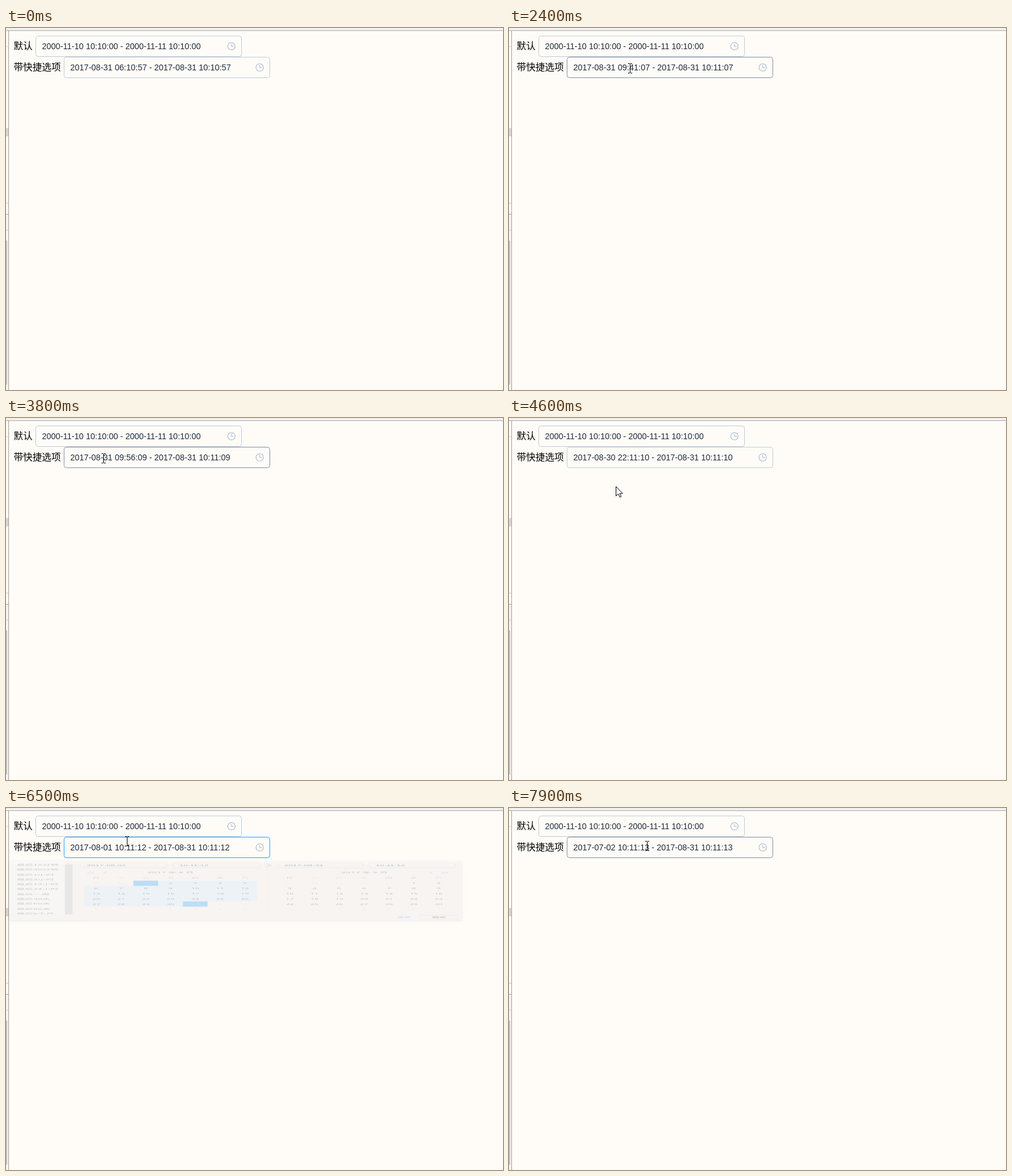
These frames come from a looping animation (843 px wide and 615 px high, 8 s). An HTML page with a canvas:

```html
<!DOCTYPE html>
<html lang="zh-CN">
<head>
<meta charset="utf-8">
<title>时间范围选择</title>
<style>
  html, body { margin: 0; width: 100%; height: 100%; overflow: hidden; background: #fffcf8; }
  canvas { display: block; }
</style>
</head>
<body>
<canvas id="stage" width="843" height="615"></canvas>
<script>
const ctx = document.getElementById('stage').getContext('2d');
const LOOP = 8000, STEP = 100, ANIM = 300;
const ARIAL = '"Liberation Sans", Arial, sans-serif';
const CJK = '"Noto Sans CJK SC", "Noto Sans CJK", sans-serif';
const NUM = '"Noto Sans", "Noto Sans CJK SC", "Noto Sans CJK", sans-serif';
const PAGE = '#fffcf8', BORDER = '#bfcbd9', BLUE = '#20a0ff', INK = '#48576a', ICON = '#97a8be';
const TOP = 91;

const SHORTCUTS = ['15分钟', '30分钟', '1小时', '4小时', '12小时', '24小时', '一周', '30天', '60天', '90天', '6个月'];

// Each session: popup opens, a shortcut is picked, the next session shows that value.
const SESSIONS = [
  { open: 975, pick: 1900, from: '2017-08-31 06:10:57', to: '2017-08-31 10:10:57' },
  { open: 2430, pick: 3100, from: '2017-08-31 09:41:07', to: '2017-08-31 10:11:07' },
  { open: 3830, pick: 4400, from: '2017-08-31 09:56:09', to: '2017-08-31 10:11:09' },
  { open: 5164, pick: 5900, from: '2017-08-30 22:11:10', to: '2017-08-31 10:11:10' },
  { open: 6480, pick: 7300, from: '2017-08-01 10:11:12', to: '2017-08-31 10:11:12' },
  { open: 1e9, pick: 1e9, from: '2017-07-02 10:11:13', to: '2017-08-31 10:11:13' }
];

// Pointer path: time, x, y
const PATH = [
  [300, 404, 131], [600, 330, 108], [900, 300, 68], [1100, 290, 68], [1200, 250, 80],
  [1400, 110, 150], [1500, 86, 157], [1700, 82, 138], [1900, 82, 138], [2200, 150, 95],
  [2400, 205, 68], [2700, 209, 68], [2800, 130, 95], [2900, 77, 107], [3100, 77, 107],
  [3500, 165, 68], [3900, 165, 68], [4000, 150, 110], [4100, 120, 183], [4200, 70, 228],
  [4400, 70, 228], [4600, 181, 116], [4800, 215, 68], [5200, 215, 68], [5300, 190, 100],
  [5500, 90, 250], [5700, 44, 320], [5900, 44, 320], [6100, 130, 180], [6300, 205, 56],
  [6500, 205, 56], [6700, 140, 190], [7000, 62, 366], [7300, 62, 366], [7500, 140, 200],
  [7700, 236, 53], [7800, 236, 53], [7900, 234, 64]
];

// cubic-bezier(.23, 1, .32, 1)
function ease(x) {
  if (x <= 0) return 0;
  if (x >= 1) return 1;
  let lo = 0, hi = 1;
  for (let i = 0; i < 24; i++) {
    const s = (lo + hi) / 2, r = 1 - s;
    if (3 * r * r * s * .23 + 3 * r * s * s * .32 + s * s * s < x) lo = s; else hi = s;
  }
  return 1 - (1 - lo) ** 3;
}

function pointerAt(t) {
  if (t < PATH[0][0]) return null;
  const i = PATH.findIndex(p => p[0] > t);
  if (i < 0) return { x: PATH.at(-1)[1], y: PATH.at(-1)[2] };
  const [t0, x0, y0] = PATH[i - 1], [t1, x1, y1] = PATH[i];
  const k = (t - t0) / (t1 - t0);
  return { x: Math.round(x0 + (x1 - x0) * k), y: Math.round(y0 + (y1 - y0) * k) };
}

function rect(x, y, w, h, color) {
  ctx.fillStyle = color;
  ctx.fillRect(x, y, w, h);
}

function text(str, x, cy, size, color, family = CJK, align = 'left') {
  ctx.font = size + 'px ' + family;
  ctx.fillStyle = color;
  ctx.textAlign = align;
  ctx.fillText(str, x, Math.round(cy + size * .36));
}

function box(x, y, w, h, border, radius = 4, fill) {
  ctx.beginPath();
  ctx.roundRect(x + .5, y + .5, w - 1, h - 1, radius);
  if (fill) { ctx.fillStyle = fill; ctx.fill(); }
  ctx.strokeStyle = border;
  ctx.lineWidth = 1;
  ctx.stroke();
}

function line(points, color, width) {
  ctx.beginPath();
  points.forEach(([x, y]) => ctx.lineTo(x, y));
  ctx.strokeStyle = color;
  ctx.lineWidth = width;
  ctx.stroke();
}

// dir: 1 points right, -1 points left
function chevron(x, y, w, h, dir, width) {
  const a = dir * w / 2;
  line([[x - a, y - h / 2], [x + a, y], [x - a, y + h / 2]], ICON, width);
}

function clock(x, y) {
  ctx.beginPath();
  ctx.arc(x, y, 6.3, 0, Math.PI * 2);
  ctx.strokeStyle = BORDER;
  ctx.lineWidth = 1.6;
  ctx.stroke();
  line([[x, y - 4], [x, y + .3], [x + 4, y + .3]], BORDER, 1.4);
}

function field(label, x, y, value, border) {
  text(label, 13, y + 17.5, 16, '#000');
  box(x, y, 350, 36, border);
  text(value, x + 11, y + 18, 14, '#1f2d3d', ARIAL);
  clock(x + 332.4, y + 18);
}

function page() {
  rect(0, 0, 843, 615, PAGE);
  rect(0, 0, 843, 4, '#f0f0f0');
  rect(0, 170, 4, 14, '#d6d6d6');
  rect(0, 317, 4, 27, '#f2f2f2');
  rect(0, 344, 4, 271, '#f4f4f4');
  rect(0, 361, 2, 245, '#c4c4c4');
  rect(0, 31, 4, 1, '#d8d8d8');
  rect(0, 297, 4, 1, '#c8c8c8');
  rect(0, 316, 4, 1, '#a0a0a0');
  rect(0, 343, 4, 1, '#cfcfcf');
  rect(0, 4, 843, 1, '#ababab');
  rect(4, 4, 1, 611, '#a0a0a0');
}

// first: weekday of day 1; start/end: picked days
function month(left, step, title, titleX, first, days, start, end) {
  text(title, titleX, 160, 14, INK, NUM, 'center');
  [...'日一二三四五六'].forEach((d, i) => text(d, left + 21 + i * step, 194, 12, '#8391a5', CJK, 'center'));
  for (let i = 0; i < 42; i++) {
    const day = i - first + 1, inside = day > 0 && day <= days;
    const x = left + (i % 7) * step, y = 209 + Math.floor(i / 7) * 32;
    const shown = day < 1 ? day + 31 : inside ? day : day - days;
    let color = inside ? INK : '#dddddd', label = shown;
    if (inside && day >= start && day <= end) {
      const edge = day === start || day === end;
      rect(x, y, 42, 32, edge ? BLUE : '#d2ecff');
      if (edge) color = '#fff';
      if (day === 31) label = '今天';
    }
    text(label, x + 21, y + 16.5, 12, color, NUM, 'center');
  }
}

function sidebar(mouse) {
  rect(6, 92, 109, 325, '#f9f9fa');
  ctx.save();
  ctx.beginPath();
  ctx.rect(6, 92, 93, 325);
  ctx.clip();
  SHORTCUTS.forEach((s, i) => {
    const y = 97 + i * 30;
    if (mouse && mouse.x < 98 && mouse.y >= y && mouse.y < y + 30) rect(6, y, 92, 30, '#e4e8f1');
    text('最后' + s, 18, y + 15, 14, INK);
  });
  ctx.restore();
  rect(98, 92, 17, 325, '#f1f1f1');
  rect(100, 108, 13, 309, '#c1c1c1');
  ctx.fillStyle = '#a3a3a3';
  ctx.beginPath();
  ctx.moveTo(103, 103);
  ctx.lineTo(106.5, 99);
  ctx.lineTo(110, 103);
  ctx.fill();
  rect(115, 92, 1, 325, '#e4e4e4');
}

function popup(s, p, mouse) {
  ctx.save();
  ctx.globalAlpha = p;
  ctx.translate(0, TOP);
  ctx.scale(1, p);
  ctx.translate(0, -TOP);

  ctx.save();
  ctx.shadowColor = 'rgba(80,100,130,.35)';
  ctx.shadowBlur = 5;
  ctx.shadowOffsetY = 1;
  rect(5, 91, 768, 362, PAGE);
  ctx.restore();
  box(5, 90, 768, 363, '#d1dbe5', 2, PAGE);

  sidebar(mouse);

  const [d0, t0] = s.from.split(' '), [d1, t1] = s.to.split(' ');
  [[126, 147, d0], [283, 148, t0], [461, 145, d1], [616, 146, t1]].forEach(([x, w, v]) => {
    box(x, 99, w, 30, BORDER);
    text(v, x + 11, 114, 13, '#1f2d3d', ARIAL);
  });
  chevron(446, 114, 8, 19, 1, 2.2);

  rect(116, 134, 656, 1, '#e4e4e4');
  rect(443, 135, 1, 282, '#e4e4e4');
  [[141, -1], [147, -1], [168, -1], [720, 1], [741, 1], [747, 1]].forEach(([x, dir]) => chevron(x, 160, 5.5, 12, dir, 1.4));

  month(132, 42, '2017 年 8 月', 279, 2, 31, +d0.slice(8), +d1.slice(8));
  month(460, 42.15, '2017 年 9 月', 608, 5, 30, 0, 0);

  rect(6, 417, 766, 1, '#dfe2e6');
  text('清空', 675, 435, 12, BLUE, CJK, 'center');
  box(702, 422, 66, 26, '#d0d0d0', 2);
  text('确定', 735, 435, 12, '#1f2d3d', CJK, 'center');
  ctx.restore();
}

const SHAPES = {
  arrow: new Path2D('M.5 .5V16.5L4.3 13 7 18.6 9.3 17.5 6.8 12.2H11.8Z'),
  hand: new Path2D('M-1.7 1.5Q0-1 1.7 1.5V7.5Q3.5 6 4.7 8 6.5 7 7.5 9 9.5 8.5 9.8 11V15Q9.6 18 7.8 20V22.5H-2.2V20.5Q-4 18-6.5 13.5 -6.8 10.5-4.2 11.5L-1.7 14Z'),
  knuckles: new Path2D('M1.7 7.5V11.5M4.7 8V12M7.5 9V12.5')
};

function pointer(m, kind) {
  ctx.save();
  ctx.translate(m.x, m.y);
  ctx.lineWidth = 1;
  ctx.strokeStyle = '#000';
  ctx.fillStyle = '#fff';
  if (kind === 'beam') {
    rect(0, -6, 1, 13, '#000');
    rect(-3, -8, 3, 1, '#000');
    rect(1, -8, 3, 1, '#000');
    rect(0, -7, 1, 1, '#000');
    rect(-3, 8, 3, 1, '#000');
    rect(1, 8, 3, 1, '#000');
    rect(0, 7, 1, 1, '#000');
  } else {
    ctx.fill(SHAPES[kind]);
    ctx.stroke(SHAPES[kind]);
    if (kind === 'hand') ctx.stroke(SHAPES.knuckles);
  }
  ctx.restore();
}

function draw(t) {
  const mouse = pointerAt(t);
  const current = SESSIONS.find(s => s.pick > t);
  const active = SESSIONS.find(s => t >= s.open && t < s.pick + ANIM);
  const focused = t >= current.open;
  const over = mouse && mouse.x > 98 && mouse.x < 448 && mouse.y >= 49 && mouse.y < 85;
  const p = active ? ease((t - active.open) / ANIM) - ease((t - active.pick) / ANIM) : 0;
  const inList = p > .9 && mouse && mouse.x < 98 && mouse.y > 97 && mouse.y < 417;

  page();
  field('默认', 50, 13, '2000-11-10 10:10:00 - 2000-11-11 10:10:00', BORDER);
  field('带快捷选项', 98, 49, current.from + ' - ' + current.to, focused ? BLUE : over ? '#8391a5' : BORDER);
  if (p > .03) popup(active, p, inList ? mouse : null);
  if (mouse) pointer(mouse, over ? 'beam' : inList ? 'hand' : 'arrow');
}

const begin = performance.now();
function tick() {
  const t = (performance.now() - begin) % LOOP;
  draw(Math.floor(t / STEP) * STEP);
  requestAnimationFrame(tick);
}
tick();
</script>
</body>
</html>
```
